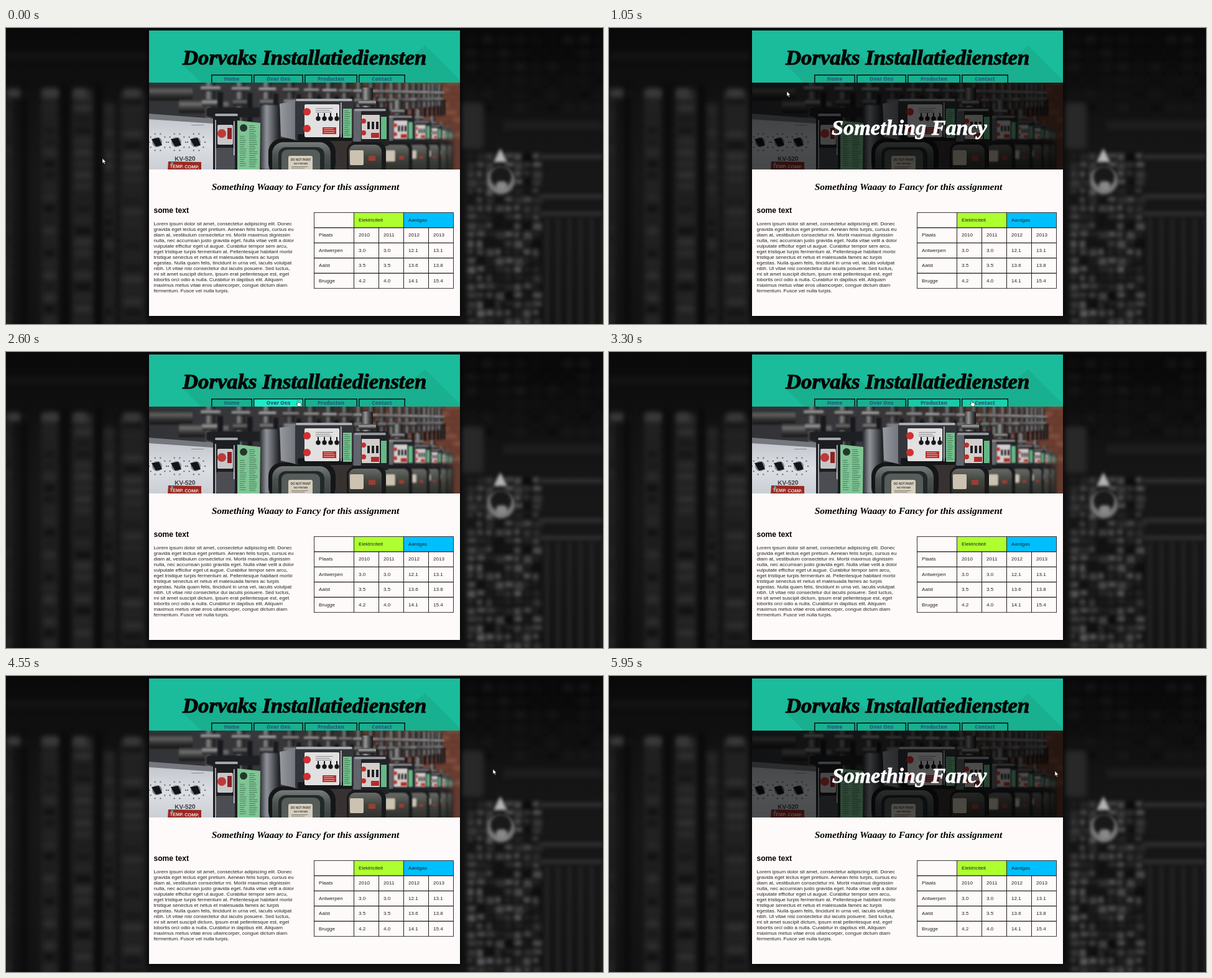
Write an HTML page with a canvas that moves like this. It is 960 px wide and 477 px high and loops after 6 s.

```html
<!DOCTYPE html>
<html lang="nl">
<head>
<meta charset="utf-8">
<title>Installatiediensten</title>
<style>
html, body { margin: 0; width: 100%; height: 100%; overflow: hidden; background: #0a0a0b; }
canvas, svg { position: absolute; left: 0; top: 0; width: 960px; height: 477px; }
text { font-family: "Liberation Sans", Arial, sans-serif; font-size: 8.08px; fill: #222; }
.script { font-family: "Liberation Serif", "Times New Roman", serif; font-weight: bold; font-style: italic; }
.nav text { font-family: "Open Sans", sans-serif; font-weight: 800; text-anchor: middle; fill: #28607c; }
</style>
</head>
<body>
<canvas id="scene" width="960" height="477"></canvas>
<svg viewBox="0 0 960 477">
  <defs>
    <clipPath id="headerClip"><rect x="230" y="4" width="500" height="84"/></clipPath>
    <text id="brand" class="script" x="284" y="59" style="font-size:34.7px;fill:inherit">Dorvaks Installatiediensten</text>
  </defs>
  <g clip-path="url(#headerClip)">
    <rect x="230" y="4" width="500" height="84" fill="#1abc9c"/>
    <g id="longShadow" fill="#19b090"><path d="M674 28l56 56v4h-40l-40-40z"/></g>
    <use href="#brand" fill="#050505" stroke="#050505" stroke-width="1"/>
    <g id="nav" class="nav"></g>
  </g>
  <g id="overlay">
    <rect x="230" y="88" width="500" height="140" fill="#000" opacity=".66"/>
    <g id="caption"><text class="script" x="483" y="172" text-anchor="middle" style="font-size:34.2px;fill:#fff;stroke:#fff;stroke-width:.8">Something Fancy</text></g>
  </g>
  <text class="script" x="481.5" y="261" text-anchor="middle" style="font-size:15.5px;fill:#000">Something Waaay to Fancy for this assignment</text>
  <text x="237.5" y="298" style="font-size:12.1px;font-weight:bold;fill:#000">some text</text>
  <g id="copy"></g>
  <g id="table"></g>
  <g id="cursor" stroke="#111" stroke-width=".6" stroke-linejoin="round">
    <path id="arrow" fill="#fff" d="M0 0v8.2l1.9-1.8 1.3 3 1.3-.6-1.3-2.8h2.6z"/>
    <path id="hand" fill="#fff" d="M-.8 .8q.9-1.4 1.8 0v3q.8-.7 1.5 .1 .8-.5 1.4 .3 1-.3 1.3 .7v2.4l-1 2.4h-3.8l-2.8-3.7q.1-1 1.6 .1z"/>
  </g>
</svg>
<script>
const byId = id => document.getElementById(id);
const LOOP = 6000, STEP = 50;

let seed = 11;
const random = () => (seed = (seed * 16807) % 2147483647) / 2147483647;
const between = (a, b) => a + random() * (b - a);
const gray = v => `rgb(${v | 0},${v | 0},${v + 1 | 0})`;

/* ---------- static scenery ---------- */
const ctx = byId('scene').getContext('2d');
const blur = px => ctx.filter = px ? `blur(${px}px)` : 'none';
function box(color, x, y, w, h, radius = 0) {
  ctx.fillStyle = color;
  ctx.beginPath();
  ctx.roundRect(x, y, w, h, radius);
  ctx.fill();
}
function shape(color, ...points) {
  ctx.fillStyle = color;
  ctx.beginPath();
  points.forEach(([x, y]) => ctx.lineTo(x, y));
  ctx.fill();
}
function disc(color, x, y, r) {
  box(color, x - r, y - r, 2 * r, 2 * r, r);
}
function shades(x0, y0, x1, y1, ...colors) {
  const gradient = ctx.createLinearGradient(x0, y0, x1, y1);
  colors.forEach((color, i) => gradient.addColorStop(i / (colors.length - 1), color));
  return gradient;
}
// Metal cylinder, lit along its length
function pipe(x, y, w, h, light = 150) {
  const end = w > h ? [x, y + h] : [x + w, y];
  box(shades(x, y, ...end, gray(light * .4), gray(light), gray(light * .5), gray(20)), x, y, w, h, 3);
}
function label(text, x, y, size, color, angle = 0) {
  ctx.save();
  ctx.translate(x, y);
  ctx.rotate(angle);
  ctx.fillStyle = color;
  ctx.font = `bold ${size}px "Liberation Sans", sans-serif`;
  ctx.textAlign = 'center';
  ctx.fillText(text, 0, 0);
  ctx.restore();
}
function tinyLines(color, x, y, w, h, gap) {
  for (let row = y; row < y + h; row += gap) box(color, x, row, between(w * .6, w), .8);
}

function drawBackdrop() {
  box(shades(0, 0, 0, 477, '#09090a', '#121213', '#171718', '#151516', '#121213'), 0, 0, 960, 477);
  blur(4);
  // Chip legs and ladders on the left
  for (const [x, w, top] of [[-4, 14, 112], [56, 28, 98], [106, 36, 98], [154, 22, 120], [184, 40, 104]]) {
    box(gray(33), x, top, w, 400, 4);
    for (let y = top + 8; y < 477; y += 18) box(gray(between(14, 50)), x + 5, y, w - 10, 10);
  }
  for (const x of [0, 58, 108, 188]) box(gray(58), x, 98, between(18, 32), 14, 5);
  for (const x of [24, 90, 144]) box('#0a0a0b', x, 90, 10, 400);
  box(gray(20), 0, 40, 230, 12);
  // Small parts and traces on the right
  for (let y = 14; y < 140; y += 22)
    for (let x = 740; x < 960; x += 26) box(gray(between(8, 26)), x, y, 17, 9);
  box(gray(40), 732, 120, 36, 75, 6);
  box(gray(30), 800, 150, 160, 14);
  blur(3);
  for (let y = 202; y < 477; y += 14)
    for (let x = 742; x < 858; x += 15) box(gray(between(12, 92)), x, y, between(8, 17), between(7, 14), 3);
  for (const y of [204, 268, 296]) box(gray(48), 858, y, 102, 7);
  for (let x = 866; x < 960; x += 18) box(gray(34), x, 306, 8, 180);
  blur(2.5);
  disc('#777', 796, 246, 22);
  disc('#19191a', 796, 240, 17);
  shape('#b5b5b5', [784, 216], [795, 194], [806, 216]);
  box('#888', 788, 247, 18, 16, 6);
  blur(0);
}

function distantMeter(x, w, soft) {
  blur(soft);
  const u = w / 58, mid = 90;
  pipe(x + 12 * u, mid - 82 * u, 18 * u, 34 * u, 150);
  pipe(x + 7 * u, mid - 62 * u, 28 * u, 9 * u, 165);
  box('#222327', x - 4 * u, mid - 50 * u, 60 * u, 62 * u, 4);
  box('#62656b', x - 2 * u, mid - 47 * u, 13 * u, 52 * u, 2);
  box('#94969b', x, mid - 48 * u, 51 * u, 4 * u, 2);
  box('#d3cecc', x + 12 * u, mid - 38 * u, 29 * u, 39 * u, 1);
  for (const y of [28, 9]) disc('#bc302e', x + 15 * u, mid - y * u, 4 * u);
  for (let i = 0; i < 3; i++) box('#202024', x + (21 + 7 * i) * u, mid - 27 * u, 4 * u, 12 * u);
  box('#b12e29', x + 27 * u, mid - 9 * u, 13 * u, 8 * u);
  box('#65b884', x + 43 * u, mid - 35 * u, 9 * u, 36 * u);
  box('#18191b', x - 12 * u, 96, 63 * u, 54, 14 * u);
  box(shades(0, 98, 0, 140, '#6b6d69', '#424640', '#302f2b'), x - 9 * u, 100, 53 * u, 48, 11 * u);
  box('#cbc2b2', x - 7 * u, 109, 22 * u, 24 * u, 2);
  box('#993e34', x + 23 * u, 118, 11 * u, 8 * u);
}

function drawPhoto() {
  ctx.save();
  ctx.beginPath();
  ctx.rect(230, 88, 500, 140);
  ctx.clip();
  ctx.translate(230, 88);
  box(shades(0, 0, 500, 0, '#323337', '#38383c', '#37302f', '#643a2f'), 0, 0, 500, 140);
  blur(3);
  for (let y = -4; y < 85; y += 12)
    for (let x = 335; x < 505; x += 29) box(random() < .5 ? '#70402f' : '#87503e', x + y % 24, y, 25, 8);
  // Gas pipes, shrinking into the distance
  blur(1.6);
  pipe(0, 5, 70, 24, 95);
  pipe(48, 27, 80, 22, 110);
  for (let i = 0; i < 20; i++) {
    const x = 500 - 410 * .88 ** i, u = .35 + .65 * .9 ** i, top = 22 * (1 - u);
    pipe(x, top - 10, 16 * u, 80 * u, between(100, 150));
    pipe(x - 7 * u, top + 5 * u, 32 * u, 9 * u, between(150, 205));
    pipe(x - 5 * u, top + 27 * u, 28 * u, 12 * u, between(110, 175));
    box('#18191c', x + 20 * u, top + 15, 9 * u, 58 * u);
  }
  for (let i = 5; i >= 0; i--) distantMeter(500 - 170 * .68 ** i, 58 * .76 ** i, .6 + i * .4);

  blur(1);
  box('#1e1f22', 92, 40, 122, 16, 4);
  box(shades(178, 0, 211, 0, '#2a2c30', '#92969c', '#55585d', '#17181b'), 178, 36, 33, 104, 8);

  // Round gas body below the central meter
  blur(.6);
  box('#141617', 192, 90, 108, 62, 22);
  box(shades(0, 95, 0, 140, '#777d7b', '#4a514f', '#3c423f'), 198, 96, 94, 60, 18);
  box('#22282a', 208, 104, 74, 44, 12);
  box('#555c59', 213, 108, 62, 40, 9);

  // Large panel with three dials
  blur(.4);
  shape('#75787e', [0, 50], [104, 58], [106, 67], [0, 62]);
  shape(shades(0, 60, 0, 140, '#c4c8ce', '#dcdfe4', '#cbced4'), [0, 59], [103, 66], [105, 140], [0, 140]);
  for (const x of [13, 44, 75]) {
    for (let k = 0; k < 10; k++) {
      const a = k * Math.PI / 5;
      box('#65676c', x + 14 * Math.cos(a), 95 + 14 * Math.sin(a), 2, 2);
    }
    disc('#85878c', x, 96, 8);
    shape('#131417', [x - 9, 91], [x + 3, 89], [x + 8, 101], [x - 2, 103]);
  }
  tinyLines('#7a7d82', 68, 68, 30, 3, 3);
  label('KV-520', 58, 126, 10, '#3b3c40', -.02);
  shape('#9a2922', [31, 127], [84, 128], [84, 141], [30, 141]);
  label('TEMP. COMP.', 57, 138, 7.4, '#f0dedb', .03);
  disc('#33b5b5', 37, 130, 2);

  // Clear housing and green plate
  box('#1d1e22', 103, 46, 43, 100, 4);
  box('#a4a7ac', 106, 50, 37, 4, 2);
  box('#c9c6c7', 110, 68, 25, 32, 2);
  disc('#be3a38', 117, 82, 7);
  box('#8d2224', 126, 73, 7, 18);
  box('#4b4d53', 108, 105, 30, 35, 3);
  box('#a0a3a8', 106, 60, 2, 80);
  box('#d5d6d9', 136, 62, 1.5, 55);
  shape('#80c595', [142, 61], [179, 65], [178, 140], [142, 140]);
  disc('#25372d', 152, 73, 6);
  tinyLines('#39694a', 161, 69, 14, 68, 3);
  tinyLines('#39694a', 146, 86, 11, 49, 3.4);

  // Central meter
  shape(shades(210, 0, 240, 0, '#9699a0', '#6c6f76'), [210, 34], [238, 29], [238, 93], [212, 87]);
  box('#33353a', 235, 27, 94, 67, 5);
  box('#a9acb1', 236, 26, 91, 4, 2);
  box('#151619', 239, 83, 88, 11, 3);
  box('#e2e0e0', 250, 35, 56, 53, 2);
  for (const y of [47, 74]) disc('#cf3030', 254, y, 6);
  tinyLines('#77767a', 268, 41, 34, 7, 3);
  for (let i = 0; i < 4; i++) {
    disc('#16171a', 272 + i * 10, 58, 3.7);
    box('#16171a', 271 + i * 10, 49, 2, 8);
  }
  box('#b4302d', 279, 72, 22, 11);
  tinyLines('#f0cfcb', 281, 74, 18, 7, 3);
  box('#71c08c', 312, 42, 14, 47);
  tinyLines('#39694a', 314, 45, 10, 40, 3);
  box('#c5c8cc', 308, 32, 1.5, 56);

  box('#d6cfbf', 224, 118, 39, 30, 3);
  label('DO NOT PAINT', 244, 126, 4.6, '#45403a');
  label('NO PINTAR', 244, 132, 4.2, '#45403a');
  tinyLines('#6e655b', 229, 135, 29, 5, 2.5);
  blur(0);
  ctx.restore();
}

drawBackdrop();
ctx.save();
ctx.shadowColor = '#000';
ctx.shadowBlur = 10;
box('#fffafa', 230, 4, 500, 460);
ctx.restore();
drawPhoto();

/* ---------- page content ---------- */
function add(parent, tag, attrs, text = '') {
  const node = document.createElementNS('http://www.w3.org/2000/svg', tag);
  for (const key in attrs) node.setAttribute(key, attrs[key]);
  node.textContent = text;
  return parent.appendChild(node);
}

for (let d = 1; d < 60; d++) add(byId('longShadow'), 'use', { href: '#brand', x: d, y: d });

`Lorem ipsum dolor sit amet, consectetur adipiscing elit. Donec
gravida eget lectus eget pretium. Aenean felis turpis, cursus eu
diam at, vestibulum consectetur mi. Morbi maximus dignissim
nulla, nec accumsan justo gravida eget. Nulla vitae velit a dolor
vulputate efficitur eget ut augue. Curabitur tempor sem arcu,
eget tristique turpis fermentum at. Pellentesque habitant morbi
tristique senectus et netus et malesuada fames ac turpis
egestas. Nulla quam felis, tincidunt in urna vel, iaculis volutpat
nibh. Ut vitae nisi consectetur dui iaculis posuere. Sed luctus,
mi sit amet suscipit dictum, ipsum erat pellentesque est, eget
lobortis orci odio a nulla. Curabitur in dapibus elit. Aliquam
maximus metus vitae eros ullamcorper, congue dictum diam
fermentum. Fusce vel nulla turpis.`.split('\n')
  .forEach((line, i) => add(byId('copy'), 'text', { x: 237.5, y: 318 + i * 9 }, line));

const table = byId('table'), columns = [495.5, 559.5, 599.5, 639.5, 679.5];
const tableTop = 297.4, rowHeight = 24.45;
const cell = (x, y, width, fill) =>
  add(table, 'rect', { x, y, width, height: rowHeight, fill, stroke: '#222', 'stroke-width': .9 });
const cellText = (x, row, text) => add(table, 'text', { x: x + 7.5, y: 312 + row * rowHeight }, text);
cell(495.5, tableTop, 64, 'none');
cell(559.5, tableTop, 80, '#adff2f');
cell(639.5, tableTop, 80, '#00bfff');
cellText(559.5, 0, 'Elektriciteit');
cellText(639.5, 0, 'Aardgas');
['Plaats 2010 2011 2012 2013', 'Antwerpen 3.0 3.0 12.1 13.1', 'Aalst 3.5 3.5 13.6 13.8', 'Brugge 4.2 4.0 14.1 15.4']
  .forEach((row, r) => row.split(' ').forEach((text, c) => {
    cell(columns[c], tableTop + (r + 1) * rowHeight, c ? 40 : 64, 'none');
    cellText(columns[c], r + 1, text);
  }));

/* ---------- motion ---------- */
const links = [
  { name: 'Home', x: 330, w: 66, hover: [[1320, 2150]] },
  { name: 'Over Ons', x: 398, w: 80, hover: [[2150, 2660]] },
  { name: 'Producten', x: 480, w: 85, hover: [[2660, 3195]] },
  { name: 'Contact', x: 567, w: 75, hover: [[3195, 3850], [5250, 5600]] },
];
for (const link of links) {
  add(byId('nav'), 'rect', { x: link.x + .75, y: 75.75, width: link.w - 1.5, height: 20, fill: 'none', stroke: '#07110f', 'stroke-width': 1.5 });
  link.glow = add(byId('nav'), 'rect', { x: link.x + 1.5, y: 76.5, width: link.w - 3, height: 12, fill: '#1cebc4' });
  add(byId('nav'), 'text', { x: link.x + link.w / 2, y: 85 }, link.name);
}
const photoHover = [[600, 1320], [3850, 4110], [4980, 5250], [5600, LOOP]];

// time, x, y of the pointer tip
const route = [
  [0, 155, 210], [600, 230, 172], [1050, 286, 102], [1320, 345, 87], [1550, 362, 79], [2000, 372, 78],
  [3300, 583, 78], [3850, 641, 87], [4100, 728, 112], [4550, 783, 150], [4750, 775, 141],
  [4980, 729, 120], [5250, 636, 87], [5420, 625, 82], [5600, 637, 88], [5950, 717, 153], [6000, 718, 154],
];

const clamp = v => Math.min(1, Math.max(0, v));
const easeOut = v => 1 - (1 - clamp(v)) ** 2;
const hoverLevel = (spans, t, duration) => Math.max(...spans.map(([enter, leave]) =>
  Math.min(easeOut((t - enter) / duration), 1 - easeOut((t - leave) / duration))));

function pointerAt(t) {
  const next = Math.max(1, route.findIndex(key => key[0] > t));
  const [t0, x0, y0] = route[next - 1], [t1, x1, y1] = route[next];
  const k = (t - t0) / (t1 - t0);
  return [x0 + (x1 - x0) * k, y0 + (y1 - y0) * k];
}

function render(t) {
  let overLink = false;
  for (const link of links) {
    link.glow.setAttribute('opacity', hoverLevel(link.hover, t, 300));
    overLink ||= link.hover.some(([enter, leave]) => t >= enter && t < leave);
  }
  const shown = hoverLevel(photoHover, t, 430);
  byId('overlay').setAttribute('opacity', shown);
  byId('caption').setAttribute('transform', `translate(483 158) scale(${.85 + .15 * shown}) translate(-483 -158)`);
  byId('cursor').setAttribute('transform', `translate(${pointerAt(t)})`);
  byId('arrow').setAttribute('visibility', overLink ? 'hidden' : 'visible');
  byId('hand').setAttribute('visibility', overLink ? 'visible' : 'hidden');
}

const start = performance.now();
function tick() {
  const t = (performance.now() - start) % LOOP;
  render(Math.floor(t / STEP) * STEP);
  requestAnimationFrame(tick);
}
tick();
</script>
</body>
</html>
```
